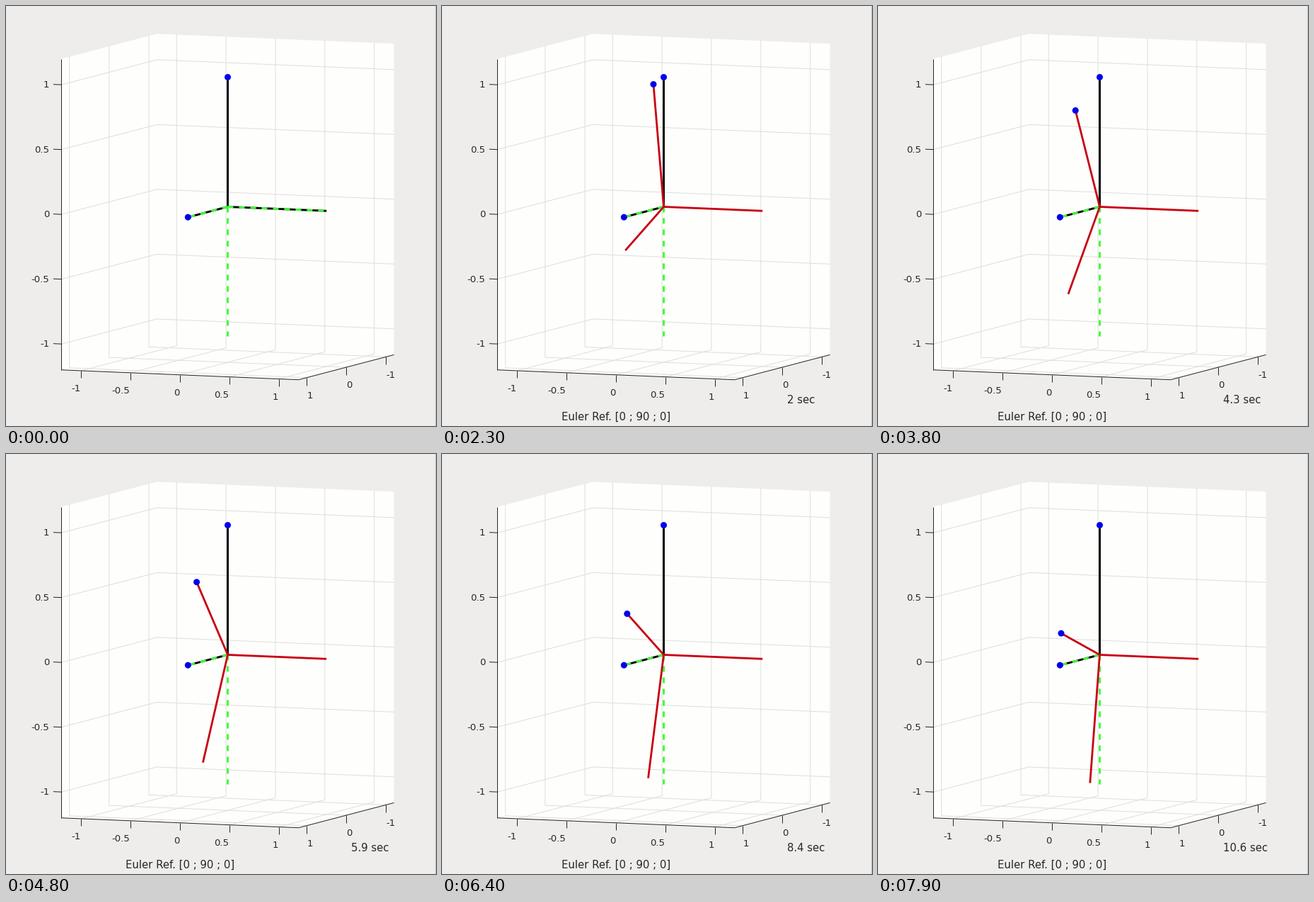
Recreate the animation shown at these times as a matplotlib script. Size 608 by 593 pixels, loop 8 s.

```python
import numpy as np
import matplotlib.pyplot as plt
from matplotlib.animation import FuncAnimation
from matplotlib.patches import Circle, Polygon

W, H, DPI = 608, 593, 64
PT = 72 / DPI  # points per pixel
INK, GRID = "#262626", "#dededd"
GREEN, RED, BLUE = "#40ff38", "#c80012", "#0000ee"
LIM = 1.2

plt.rcParams["font.family"] = "DejaVu Sans"
plt.rcParams["lines.scale_dashes"] = False

fig = plt.figure(figsize=(W / DPI, H / DPI), dpi=DPI, facecolor="#eeedeb")
ax = fig.add_axes([0, 0, 1, 1])
ax.set(xlim=(0, W), ylim=(H, 0))
ax.axis("off")

ORIGIN = np.array([313.5, 283.5])
BASIS = np.array([[139.7, 5.8], [-56.2, 14.7], [0, -183]])


def project(x, y, z):
    return ORIGIN + np.array([x, y, z]) @ BASIS


def line(p, q, color, width, **kw):
    art, = ax.plot([p[0], q[0]], [p[1], q[1]], color=color, lw=width * PT,
                   solid_capstyle="butt", dash_capstyle="butt", **kw)
    return art


def rod(axis, color, width, **kw):
    """Thick line from the origin, kept at its exact sub-pixel place."""
    return line(ORIGIN, project(*axis), color, width, snap=False, **kw)


def dot(p):
    return ax.add_patch(Circle(p, 4.5, facecolor=BLUE, edgecolor="none", zorder=8))


def label(x, y, text, size=13.2, ha="left"):
    return ax.text(x, y, text, size=size * PT, color=INK, ha=ha, va="baseline")


def grid(points):
    x, y = np.transpose([project(*p) for p in points])
    ax.plot(x, y, color=GRID, lw=PT, zorder=1)


def draw_box():
    hull = [(-1, 1, 1), (-1, -1, 1), (1, -1, 1), (1, -1, -1), (1, 1, -1), (-1, 1, -1)]
    ax.add_patch(Polygon([project(*(LIM * np.array(c))) for c in hull],
                         facecolor="#fefefc", edgecolor="none", zorder=0))
    ticks = [-1, -0.5, 0, 0.5, 1]
    for v in ticks:
        grid([(v, LIM, -LIM), (v, -LIM, -LIM), (v, -LIM, LIM)])
        grid([(-LIM, LIM, v), (-LIM, -LIM, v), (LIM, -LIM, v)])
    for v in (-1, 0, 1):
        grid([(LIM, v, -LIM), (-LIM, v, -LIM), (-LIM, v, LIM)])

    corner = project(-LIM, LIM, -LIM)
    front = project(LIM, LIM, -LIM)
    line(project(-LIM, LIM, LIM), corner, INK, 1)
    line(corner, front, INK, 1)
    line(front, project(LIM, -LIM, -LIM), INK, 1)

    for v in ticks:
        p = project(-LIM, LIM, v)
        line(p, p + [-11.5, -0.5], INK, 1)
        label(61.5, p[1] + 3.9, f"{v:g}", ha="right")
        p = project(v, LIM, -LIM)
        line(p, p + [0, 10.5], INK, 1)
        label(p[0] - 1, p[1] + 29, f"{v:g}", ha="right")
    for v in (-1, 0, 1):
        p = project(LIM, v, -LIM)
        line(p, p + [0, 11], INK, 1)
        label(p[0] + 0.3, p[1] + 29.3, f"{v:g}")


draw_box()
line((607, 0), (607, H), "#c4c4c4", 1)

X, Y, Z = np.eye(3)
dashes = (0, (8 * PT, 8 * PT))
start = [rod(v, "black", 2.9, zorder=4) for v in (X, Y, Z)]
goal = [rod(v, GREEN, 3, zorder=5, ls=dashes) for v in (X, Y, -Z)]
dot(project(*Z))
dot(project(*Y))

body = [rod(v, RED, 2.8, zorder=6) for v in (X, Y, Z)]
tip = dot(project(*Z))
caption = label(169, 585, "Euler Ref. [0 ; 90 ; 0]", 14.9)
clock = label(488, 561, "", 14.9)

# Ticks that repeat the step before, and the seconds reached at some steps
HOLDS = np.array([17, 28, 35, 55, 72, 76])
STEPS = [0, 2, 11, 16, 22, 24, 34, 49, 62]
SECONDS = [0.1, 0.3, 2, 3, 4, 4.3, 5.9, 8.4, 10.6]

# Pitch in degrees over simulated seconds
KEY_T = np.array([0, 0.3, 2, 4.3, 5.9, 8.4, 10.6])
KEY_A = np.array([0, 0.8, 15, 37.6, 51.4, 67, 75.9])
SLOPE = np.gradient(KEY_A, KEY_T)


def pitch(t):
    """Cubic Hermite curve through the key angles."""
    i = int(np.clip(np.searchsorted(KEY_T, t) - 1, 0, len(KEY_T) - 2))
    h = KEY_T[i + 1] - KEY_T[i]
    u = (t - KEY_T[i]) / h
    ease = u * u * (3 - 2 * u)
    bend = h * u * (1 - u) * ((1 - u) * SLOPE[i] - u * SLOPE[i + 1])
    return KEY_A[i] + (KEY_A[i + 1] - KEY_A[i]) * ease + bend


def update(n):
    shown, running = n >= 8, n >= 11
    t = 0
    if running:
        t = np.interp(n - 11 - np.sum(HOLDS <= n), STEPS, SECONDS)
    a = np.radians(pitch(t))
    c, s = np.cos(a), np.sin(a)
    ends = [project(*v) for v in (X, c * Y - s * Z, s * Y + c * Z)]
    for art, end in zip(body, ends):
        art.set_data([ORIGIN[0], end[0]], [ORIGIN[1], end[1]])
    tip.set_center(ends[2])
    for art in (*body, tip, caption):
        art.set_visible(shown)
    # The turning axis stays under the body, so its other lines drop out
    for art in (start[0], goal[0]):
        art.set_visible(not shown)
    clock.set_text(f"{round(t, 1):g} sec" if running else "")
    return (*body, tip, caption, clock)


anim = FuncAnimation(fig, update, frames=80, interval=100, repeat=True,
                     repeat_delay=0, blit=False)
plt.show()
```
